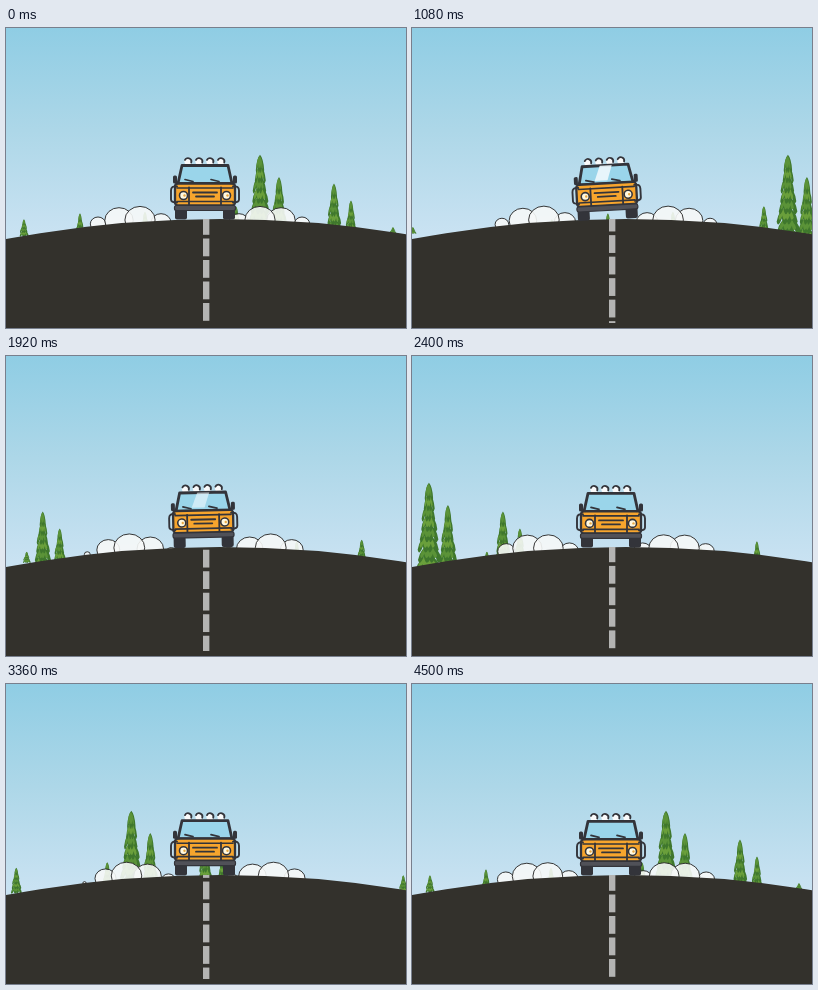
Recreate the animation shown at these times as an HTML page with a canvas. Size 400x300 px, loop 4530 ms.

```html
<!DOCTYPE html>
<html>
<head>
<meta charset="utf-8">
<style>
html, body { margin: 0; width: 100%; height: 100%; overflow: hidden; }
canvas { display: block; width: 400px; height: 300px; }
</style>
</head>
<body>
<canvas id="stage" width="400" height="300"></canvas>
<script>
const ctx = document.getElementById('stage').getContext('2d');
const { PI, sin, cos, min, max, floor } = Math;
const LOOP = 4530, TRAVEL = 4500, SPAN = 508;
const INK = '#33343a', ROAD = '#33312c', ORANGE = '#f7a52d';
const HILL = { x: 214, top: 191, radius: 1150 };

// Tree tips at the start of the loop; the size follows from the height.
const treeTips = [
  [312, 197], [387, 200], [18, 193], [74, 188], [139, 186], [230, 181],
  [345, 176], [328, 160], [273, 154], [254, 132]
];

const clamp01 = v => max(0, min(1, v));

function paint(fill, stroke, width) {
  if (fill) { ctx.fillStyle = fill; ctx.fill(); }
  if (stroke) { ctx.strokeStyle = stroke; ctx.lineWidth = width; ctx.stroke(); }
}

function shape(points, fill, stroke, width) {
  ctx.beginPath();
  points.forEach(([x, y]) => ctx.lineTo(x, y));
  ctx.closePath();
  paint(fill, stroke, width);
}

function line(x1, y1, x2, y2, width = 2) {
  ctx.beginPath();
  ctx.moveTo(x1, y1);
  ctx.lineTo(x2, y2);
  paint(null, INK, width);
}

function ellipse(x, y, rx, ry, fill, stroke, width) {
  ctx.beginPath();
  ctx.ellipse(x, y, rx, ry, 0, 0, PI * 2);
  paint(fill, stroke, width);
}

function box(x, y, w, h, r, fill, stroke, width) {
  ctx.beginPath();
  ctx.roundRect(x, y, w, h, r);
  paint(fill, stroke, width);
}

function sky() {
  const g = ctx.createLinearGradient(0, 0, 0, 205);
  g.addColorStop(0, '#8fcde4');
  g.addColorStop(.5, '#add7e8');
  g.addColorStop(1, '#c9e2f2');
  ctx.fillStyle = g;
  ctx.fillRect(0, 0, 400, 300);
}

// One drooping layer of branches with a lobed lower edge.
function skirt(x, top, bottom, r, color) {
  const lobes = 4, step = 2 * r / lobes, drop = (bottom - top) * .22;
  ctx.beginPath();
  ctx.moveTo(x, top);
  ctx.quadraticCurveTo(x + r * .8, top + drop, x + r, bottom);
  for (let i = 1; i <= lobes; i++) {
    const end = x + r - i * step;
    ctx.quadraticCurveTo(end + step * .3, bottom + drop * 2, end, bottom - (i < lobes ? drop * (i % 2) : 0));
  }
  ctx.quadraticCurveTo(x - r * .8, top + drop, x, top);
  paint(color);
}

function tree(x, top) {
  const height = 204 - top, half = 3 + height * .135;
  const tiers = 3 + floor(height / 18), step = height / tiers;
  for (let i = tiers; i >= 0; i--) {
    const y = top + i * step, r = half * (.3 + .7 * min(1, (i + .3) / tiers));
    const lean = sin(i * 2.3) * r * .08;
    skirt(x + lean, y - step * .5, y + step, r, '#3f772d');
    skirt(x + lean - r * .1, y - step * .4, y + step * .62, r * .72, i % 2 ? '#6a9f3b' : '#5b9338');
  }
}

function forest(t) {
  for (const [x, top] of treeTips)
    tree((x + SPAN * t / TRAVEL + 60) % SPAN - 60, top);
}

// Puffs drift outward, swelling and shrinking on the way.
function smoke(t) {
  const pitch = 21, phase = 13 * t / LOOP % 1;
  const puffs = [];
  for (let k = 0; k < 6; k++) {
    const d = 3 + pitch * (k + phase);
    if (d > 22 && d < 125) puffs.push({ d, r: 15.5 * sin(PI * (d - 22) / 103) });
  }
  puffs.sort((a, b) => a.r - b.r);
  for (const { d, r } of puffs)
    for (const x of [200 - d, 188 + d])
      ellipse(x, 200 - r * .53, r, r * .9, 'rgba(246,248,247,.9)', '#222', .9);
}

function road(t) {
  ctx.beginPath();
  ctx.arc(HILL.x, HILL.top + HILL.radius, HILL.radius, PI * 1.4, PI * 1.6);
  ctx.lineTo(400, 300);
  ctx.lineTo(0, 300);
  paint(ROAD);
  ctx.save();
  ctx.beginPath();
  ctx.rect(197, 191, 6.6, 104);
  ctx.clip();
  ctx.fillStyle = '#b4b4b3';
  const pitch = 21.5, p = t / TRAVEL;
  const shift = (7 * p + .24 * sin(PI * p)) % 1 * pitch;
  for (let y = 146 + shift; y < 296; y += pitch) ctx.fillRect(197, y, 6.6, 17.8);
  ctx.restore();
}

function glare(t) {
  const x = 12 - 17 * clamp01((t - 570) / 510);
  ctx.save();
  ctx.beginPath();
  ctx.moveTo(-23, -54); ctx.lineTo(23, -54);
  ctx.lineTo(25, -39); ctx.lineTo(-25, -39);
  ctx.clip();
  ctx.globalAlpha = sin(PI * clamp01((t - 350) / 2000));
  shape([[x, -55], [x + 12, -55], [x + 6, -37], [x - 7, -37]], '#eff9fd');
  ctx.restore();
}

// Drawn around the middle of the ground line between the wheels.
function car(t) {
  const lean = sin(PI * clamp01((t - 600) / 1550)) ** 1.5;
  ctx.save();
  ctx.translate(199 - 4 * lean, 191);
  ctx.rotate(-4.2 * lean * PI / 180);
  ctx.lineCap = ctx.lineJoin = 'round';
  for (const side of [-1, 1]) box(side * 24 - 6, -11, 12, 11.5, 2, INK);

  ctx.translate(0, .5 * cos(26 * PI * t / LOOP));
  for (let i = 0; i < 4; i++) {
    const x = -17 + i * 11;
    ellipse(x, -58, 3.6, 3.6, '#fafafa');
    ctx.beginPath();
    ctx.arc(x, -58, 3.4, PI * 1.15, PI * 2.1);
    paint(null, INK, 1.8);
  }
  shape([[-23, -54], [23, -54], [27, -36], [-27, -36]], '#9ad5ea', INK, 2.8);
  glare(t);
  for (const x of [-20, 6]) line(x, -40, x + 8, -38, 1.7);

  box(-30, -36, 60, 22, 3, ORANGE, INK, 2.3);
  line(-28, -31.5, 28, -31.5, 1.6);
  line(-12, -27, 12, -27, 1.8);
  line(-9, -23, 9, -23, 1.8);
  for (const side of [-1, 1]) {
    const at = d => side * d;
    line(at(26), -36, at(30), -37, 1.5);
    box(at(30) - 2, -44, 4, 8, 1.5, INK);
    ellipse(at(21.5), -24, 4, 4, '#fff8df', INK, 1.6);
    ellipse(at(21.5) + 1, -24, 1.2, 1.2, '#e9a944');
    line(at(16), -32, at(16), -14, 1.8);
    ctx.beginPath();
    ctx.moveTo(at(28), -33);
    ctx.quadraticCurveTo(at(34), -34, at(34), -29);
    ctx.lineTo(at(34), -20);
    ctx.quadraticCurveTo(at(34), -17, at(28), -17);
    paint(null, INK, 1.9);
  }
  line(-28, -18, 28, -18, 1.7);
  box(-30.5, -14, 61, 5, 2, '#505158', INK, 1.2);
  ctx.restore();
}

function draw(now) {
  const t = min(TRAVEL, floor(now % LOOP / 30) * 30);
  sky();
  forest(t);
  smoke(t);
  road(t);
  car(t);
}

let begin;
function tick(now) {
  begin ??= now;
  draw(now - begin);
  requestAnimationFrame(tick);
}
draw(0);
requestAnimationFrame(tick);
</script>
</body>
</html>
```
